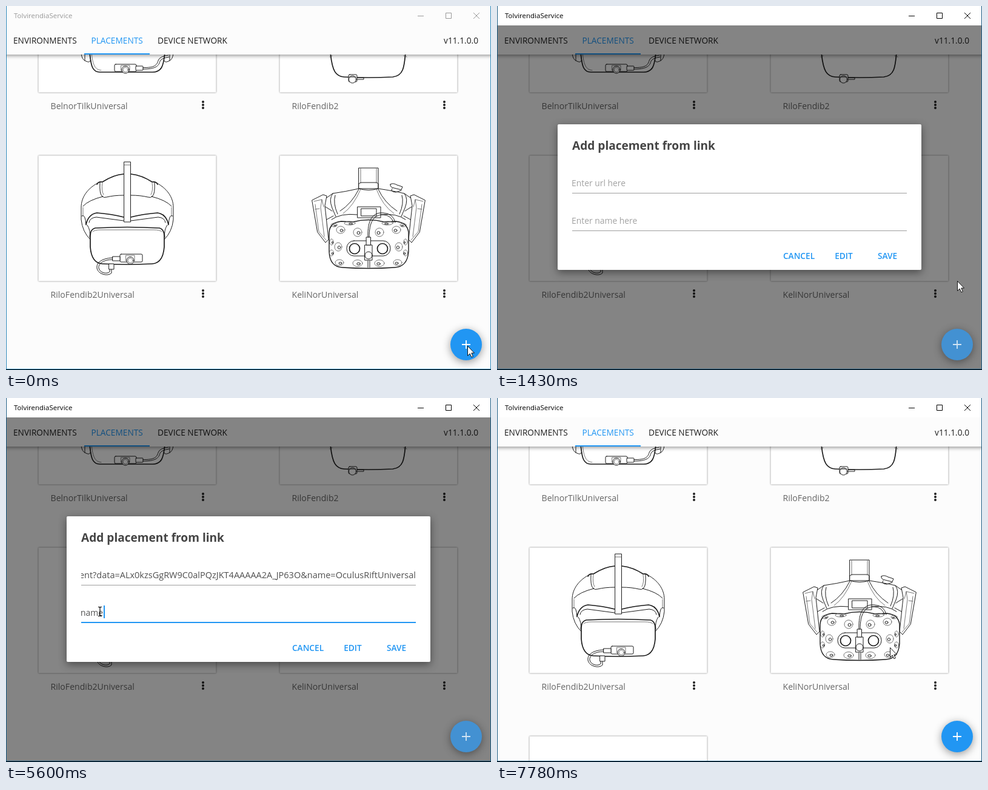
Write an HTML page that moves like this. It is 800 px wide and 600 px high and loops after 8 s.

```html
<!DOCTYPE html>
<html lang="en">
<head>
<meta charset="utf-8">
<title>Add placement from link</title>
<style>
  html, body { margin: 0; width: 100%; height: 100%; overflow: hidden; background: #fcfcfc; }
  svg { display: block; width: 800px; height: 600px; font-family: "Open Sans", "Noto Sans", sans-serif; }
  .menu { font-size: 13.7px; fill: #1c1c1c; }
  .label { font-size: 14.1px; fill: #666; }
  .field { font-size: 13.9px; fill: #505050; }
  .hint { font-size: 13.9px; fill: #a2a2a2; }
  .button { font-size: 13.7px; font-weight: 600; fill: #2196f3; text-anchor: middle; }
  .tip { font-size: 13.1px; font-weight: 600; fill: #9c9c9c; text-anchor: end; }
  .card { fill: #fff; filter: drop-shadow(0 0 1.3px rgba(0,0,0,.55)); }
  .art { fill: none; stroke: #1c1c1c; stroke-width: 1; stroke-linejoin: round; stroke-linecap: round; }
  .art .bold { stroke-width: 1.7; }
  .art .fine { stroke: #555; stroke-width: .8; }
  .art .solid { fill: #fff; }
  .raised { filter: drop-shadow(0 2px 3px rgba(0,0,0,.4)); }
  .floating { filter: drop-shadow(0 3px 7px rgba(0,0,0,.4)); }
  .blue { fill: #2196f3; }
  .icon { fill: none; stroke: #fff; stroke-width: 1.5; }
  #dialog { transform-origin: 400px 315px; }
  #plus { transform-origin: 759px 558px; stroke-width: 1.8; }
  #shade, #actions, #dialog, #newCard { opacity: 0; }
</style>
</head>
<body>
<svg viewBox="0 0 800 600">
  <defs>
    <clipPath id="urlClip"><rect x="124" y="278" width="552" height="30"/></clipPath>
    <clipPath id="pageClip"><rect x="0" y="80" width="800" height="518"/></clipPath>
    <rect id="card" class="card" x="53.5" y="246.5" width="293" height="207" rx="1"/>
    <g id="dots" fill="#222">
      <circle cx="325" cy="158" r="2"/><circle cx="325" cy="163" r="2"/><circle cx="325" cy="168" r="2"/>
    </g>
  </defs>

  <rect width="800" height="600" fill="#fcfcfc"/>

  <g clip-path="url(#pageClip)">
    <use href="#card" y="-311"/>
    <use href="#card" x="398" y="-311"/>
    <use href="#card"/>
    <use href="#card" x="398"/>
    <use id="newCard" href="#card" y="311"/>
    <use href="#dots"/>
    <use href="#dots" x="398"/>
    <use href="#dots" y="311"/>
    <use href="#dots" x="398" y="311"/>
    <g class="label">
      <text x="73.500" y="170">BelnorTilkUniversal</text>
      <text x="471.500" y="170">RiloFendib2</text>
      <text x="73.500" y="481">RiloFendib2Universal</text>
      <text x="471.500" y="481">KeliNorUniversal</text>
    </g>

    <!-- upper left headset -->
    <g class="art">
      <path class="bold" d="M138 76C140 100 143 109 155 109H242C256 109 260 100 262 76"/>
      <path class="fine" d="M141 76C143 98 147 105 157 106"/>
      <path d="M124 78Q125 89 132 91Q138 94 139 90M276 78Q275 89 268 91Q262 94 261 90M130 78V90M270 78V90"/>
      <rect class="solid" x="179" y="96" width="36" height="12" rx="2"/>
      <rect class="solid fine" x="190" y="98" width="14" height="8"/>
      <circle class="solid" cx="197" cy="105" r="6"/>
      <circle class="fine" cx="197" cy="105" r="4"/>
      <rect class="solid" x="214" y="99" width="12" height="7" rx="1"/>
      <path d="M226 101.500C244 102 249 98 251 90Q253 83 268 81M226 104C247 104 252 99 254 91Q256 86 269 84"/>
    </g>

    <!-- upper right headset -->
    <g class="art">
      <path class="bold" d="M535 76C538 108 544 116 558 117Q598 119 638 117C655 115 657 102 659 76"/>
      <path class="fine" d="M538 82L534 84M656 82L661 84"/>
      <rect class="solid" x="565" y="113" width="14" height="12" rx="2"/>
      <circle class="solid" cx="571.5" cy="121" r="6"/>
      <path d="M579 118H590V121H579M566 117H577"/>
    </g>

    <!-- lower left headset -->
    <g class="art">
      <path d="M151 292C136 300 124 314 124 332V352Q126 372 139 385M249 292C264 300 276 314 276 332V352Q274 372 261 385"/>
      <path class="bold" d="M150 294Q152 289 159 290Q178 278 194 277M206 277Q224 279 241 290Q248 289 250 294"/>
      <path d="M155 291Q154 309 158 313Q161 317 166 315Q178 312 194 312M245 291Q246 309 242 313Q239 317 234 315Q222 312 206 312"/>
      <path class="fine" d="M159 291Q157 305 161 311M241 291Q243 305 239 311M127 332V346M273 332V346"/>
      <path d="M127 330Q136 320 160 314M273 330Q264 320 240 314M125 346Q131 342 132 361M275 346Q269 342 268 361"/>
      <path class="bold" d="M132 360Q136 343 150 341Q175 343 194 348M268 360Q264 343 250 341Q225 343 206 348"/>
      <path d="M137 357Q138 349 149 348L194 354M263 357Q262 349 251 348L206 354M134 361Q140 370 138 381M266 361Q260 370 262 381"/>
      <rect class="solid" x="195" y="257" width="10.500" height="99"/>
      <path class="fine" d="M195 262H205"/>
      <path class="bold solid" d="M147 366Q200 363 253 366Q261 368 261 379V397Q259 424 241 425Q200 427 159 425Q141 424 139 397V379Q139 368 147 366Z"/>
      <path class="fine" d="M143 372Q146 369 156 369H244Q254 369 257 372"/>
      <rect class="solid" x="188" y="409" width="37" height="13" rx="2"/>
      <rect class="solid fine" x="198" y="411" width="14" height="9"/>
      <circle class="solid" cx="205" cy="419.500" r="6"/>
      <circle class="fine" cx="205" cy="419.500" r="4"/>
      <rect class="solid" x="176" y="413" width="12" height="7"/>
      <path d="M176 415C156 416 149 424 150 432C152 443 169 446 174 440V433M176 418C160 418 152 425 153 432C155 441 168 442 171 438V433"/>
      <rect class="solid" x="170" y="425" width="8" height="9"/>
    </g>

    <!-- lower right headset -->
    <g class="art">
      <g id="ear">
        <path d="M505 320L523 311L529 313L526 329L532 385L527 390L514 373Z"/>
        <path class="fine" d="M508 322L521 319L524 331M510 327L516 372L528 386M521 319L519 332L525 380M510 335L517 334"/>
        <path d="M529 316L539 309M527 331L538 338M529 352L540 346"/>
      </g>
      <use href="#ear" transform="matrix(-1 0 0 1 1196 0)"/>
      <path d="M539 309Q560 306 582 301M614 301Q640 305 657 309Q664 318 658 333L652 347M539 309Q532 318 538 333L544 347"/>
      <path d="M543 312Q539 325 547 343M653 312Q657 325 649 343M582 302Q570 326 551 338M614 302Q624 324 645 338"/>
      <path class="fine" d="M585 302Q573 330 556 342M611 302Q621 329 640 342"/>
      <path d="M537 352Q552 341 580 344M659 352Q644 341 618 344"/>
      <rect class="solid" x="582" y="267" width="32" height="34"/>
      <path class="fine" d="M585 268V292M611 268V292"/>
      <path d="M582 293Q585 290 588 291H608Q612 290 614 293V301Q598 306 582 301Z"/>
      <path d="M634 294Q633 299 640 300L652 303L654 298L645 295Q638 291 634 294ZM637 301Q633 306 643 307L652 304"/>
      <rect class="solid" x="580" y="331" width="38" height="18"/>
      <rect x="586" y="334" width="25" height="12"/>
      <path class="solid" stroke-width="1.400" d="M533 373Q534 357 553 355L572 356Q598 349 624 356L643 355Q662 357 664 373V405Q662 430 641 431Q598 434 555 431Q534 430 533 405Z"/>
      <g id="sensors"></g>
      <rect class="solid" x="562" y="387" width="72" height="25" rx="12"/>
      <circle class="bold" cx="575" cy="400" r="8.500"/>
      <circle class="bold" cx="621" cy="400" r="8.500"/>
      <rect class="solid" x="592" y="394" width="12" height="25"/>
      <circle class="solid" cx="598" cy="411" r="6"/>
      <rect class="solid" x="594.500" y="381" width="7" height="13"/>
      <path d="M597 381C596 352 605 340 622 341Q639 342 642 357M599 381C599 355 607 344 622 344Q636 345 639 357M597 420V431M600 420V431"/>
    </g>
  </g>

  <rect class="raised" x="-10" y="32" width="820" height="48" fill="#fcfcfc"/>
  <g class="menu">
    <text x="12" y="62">ENVIRONMENTS</text>
    <text x="140.500" y="62" class="blue">PLACEMENTS</text>
    <text x="250" y="62">DEVICE NETWORK</text>
    <text x="779" y="62" text-anchor="end">v11.1.0.0</text>
  </g>
  <rect class="blue" x="129" y="78" width="108" height="2"/>

  <g id="titleBar">
    <rect id="titleBack" width="800" height="32" fill="#fcfcfc"/>
    <text x="13" y="20" font-size="11.5" fill="currentColor">TolvirendiaService</text>
    <path d="M679 16.500H689M725.500 11.500H734.500V20.500H725.500ZM771 11L781 21M781 11L771 21" fill="none" stroke="currentColor"/>
  </g>

  <rect id="shade" y="32" width="800" height="568"/>

  <g id="fab">
    <circle id="disc" class="blue floating" cx="759" cy="558" r="26"/>
    <path id="plus" class="icon" d="M752 558H766M759 551V565"/>
  </g>

  <g id="actions">
    <g class="raised" fill="#fff">
      <rect x="654" y="436" width="76" height="36" rx="2"/>
      <rect x="666" y="484" width="64" height="36" rx="2"/>
    </g>
    <text class="tip" x="722" y="460">From link</text>
    <text class="tip" x="722" y="508">Custom</text>
    <g class="raised" fill="#f00">
      <circle cx="759" cy="454" r="18"/>
      <circle cx="759" cy="502" r="18"/>
    </g>
    <circle id="ripple" cx="759.500" cy="453.500" r="12.500" fill="#f97a00"/>
    <path class="icon" d="M757.500 450H755.500A4 4 0 0 0 755.500 458H757.500M760.500 450H762.500A4 4 0 0 1 762.500 458H760.500M756 454H762"/>
    <path class="icon" d="M759 497H753V508H764.500V502M757 504L758 501L764 495L766 497L760 503Z"/>
  </g>

  <g id="dialog">
    <rect x="100" y="195" width="600" height="240" rx="2" fill="#fff" style="filter:drop-shadow(0 4px 7px rgba(0,0,0,.45))"/>
    <text x="124" y="237" font-size="19.1" font-weight="700" fill="#444">Add placement from link</text>
    <path d="M124 308.500H676M124 370.500H676" stroke="#9e9e9e"/>
    <rect id="urlFocus" class="blue" x="124" y="307" width="552" height="2"/>
    <rect id="nameFocus" class="blue" x="124" y="369" width="552" height="2"/>
    <text id="urlHint" class="hint" x="123" y="297">Enter url here</text>
    <text id="nameHint" class="hint" x="123" y="359">Enter name here</text>
    <g id="url" clip-path="url(#urlClip)">
      <text class="field" x="676" y="297" text-anchor="end" style="font-size:14.5px">placement?data=ALx0kzsGgRW9C0alPQzJKT4AAAAA2A_JP63O&amp;name=OculusRiftUniversal</text>
    </g>
    <text id="name" class="field" x="123" y="359"><tspan>n</tspan><tspan>a</tspan><tspan>m</tspan><tspan>e</tspan></text>
    <g id="urlBlink"><rect id="urlCaret" class="blue" x="124" y="280" width="2" height="21"/></g>
    <g id="nameBlink"><rect id="nameCaret" class="blue" x="124" y="342" width="2" height="21"/></g>
    <text class="button" x="498" y="417">CANCEL</text>
    <text class="button" x="572" y="417">EDIT</text>
    <text class="button" x="644" y="417">SAVE</text>
  </g>

  <path id="frame" d="M.5 0V599M799.500 0V599M0 598.500H800" fill="none" stroke="#2b86b8"/>
  <rect y="599" width="800" height="1"/>

  <g id="mouse">
    <path id="arrow" d="M.5 .5V16.500L4.200 13L6.800 18.800L9.300 17.700L6.800 12H11.500Z" fill="#fff" stroke="#000" stroke-width=".9"/>
    <path id="beam" d="M-3 -7.500H-1L0 -6.500L1 -7.500H3M0 -6.500V6.500M-3 7.500H-1L0 6.500L1 7.500H3" fill="none" stroke="#000" stroke-width="1.200"/>
  </g>
</svg>

<script>
const LOOP = 8000;
const $ = id => document.getElementById(id);

// keys: [ms, value] pairs, the first at 0
function play(el, prop, keys, easing = 'linear') {
  const all = [...keys, [LOOP, keys[keys.length - 1][1]]];
  el.animate(
    all.map(([ms, value]) => ({ offset: ms / LOOP, [prop]: value, easing })),
    { duration: LOOP, iterations: Infinity }
  );
}
const jump = (el, prop, keys) => play(el, prop, keys, 'step-end');

// toggles visibility at each time
function flip(el, times, start = 0) {
  jump(el, 'opacity', [0, ...times].map((ms, i) => [ms, (start + i) % 2]));
}

const move = (x, y) => `translate(${x}px, ${y}px)`;

// sensor dimples: the left half is mirrored
const dimples = [
  [552, 369, 7, 6], [580, 373, 7, 7], [567, 358, 9, 3], [548, 397, 6, 7],
  [537, 407, 3.5, 5], [537, 389, 3, 5], [550, 423, 7, 5], [580, 424, 8, 5.5], [541, 361, 5, 3]
];
$('sensors').innerHTML = dimples.map(([x, y, rx, ry]) => [x, 1196 - x].map(cx => {
  const inner = cx + (cx < 598 ? 1.5 : -1.5);
  return `<ellipse class="fine" cx="${cx}" cy="${y}" rx="${rx}" ry="${ry}"/>` +
    `<ellipse cx="${inner}" cy="${y + 1}" rx="${rx * .35}" ry="${ry * .35}"/>`;
}).join('')).join('');

// window gets the focus
jump($('titleBar'), 'color', [[0, '#999'], [260, '#000']]);
jump($('titleBack'), 'fill', [[0, '#fcfcfc'], [260, '#fff']]);
jump($('frame'), 'stroke', [[0, '#2b86b8'], [260, '#1a5a82']]);

// action menu
play($('shade'), 'opacity', [[0, 0], [240, 0], [390, .5], [1300, .5], [1425, .48], [7510, .48], [7640, .145], [7710, 0]]);
play($('actions'), 'opacity', [[0, 0], [240, 0], [390, 1], [1330, 1], [1420, 0]]);
play($('plus'), 'transform', [[0, 'rotate(0deg)'], [240, 'rotate(0deg)'], [390, 'rotate(45deg)'],
  [1330, 'rotate(45deg)'], [1425, 'rotate(0deg)']]);
play($('plus'), 'opacity', [[0, 1], [1330, 1], [1425, .75], [7510, .75], [7640, .85], [7710, 1]]);
play($('disc'), 'fill', [[0, '#2196f3'], [1330, '#2196f3'], [1425, '#4391d2'],
  [7510, '#4391d2'], [7640, '#2684d3'], [7710, '#2196f3']]);
flip($('ripple'), [1280, 1400]);

// dialog
play($('dialog'), 'opacity', [[0, 0], [1330, 0], [1425, 1], [7510, 1], [7570, .3], [7640, .03], [7680, 0]]);
play($('dialog'), 'transform', [[0, 'scale(.9)'], [1330, 'scale(.9)'], [1425, 'scale(1)'],
  [7510, 'scale(1)'], [7570, 'scale(.92)'], [7630, 'scale(.9)']]);
flip($('urlFocus'), [1570, 4340]);
flip($('nameFocus'), [4340]);
flip($('url'), [3530]);
flip($('urlHint'), [3530], 1);
flip($('nameHint'), [4800], 1);
flip($('urlBlink'), [1570, 2040, 2410, 2810, 2940, 3200, 3330, 4060, 4270, 4340]);
jump($('urlCaret'), 'transform', [[0, move(0, 0)], [3530, move(552, 0)]]);
flip($('nameBlink'), [4340, 4540, 4740, 5470, 5600, 5730, 5930, 6400, 6670, 6910, 7110]);

const typed = [4800, 4940, 5070, 5270];
[...$('name').children].forEach((letter, i) =>
  jump(letter, 'fill', [[0, 'transparent'], [typed[i], '#505050']]));
jump($('nameCaret'), 'transform', [[0, move(0, 0)],
  ...[8, 16, 29, 37].map((x, i) => [typed[i], move(x, 0)])]);

flip($('newCard'), [7740]);

// pointer
play($('mouse'), 'transform', [
  [0, 761, 560], [560, 761, 560], [800, 757, 520], [1090, 759, 453], [1450, 759, 453],
  [2040, 453, 367], [2810, 158, 287], [3600, 158, 287], [4270, 155, 352], [5870, 155, 352],
  [6690, 646, 409], [6770, 646, 409], [6910, 648, 411]
].map(([ms, x, y]) => [ms, move(x, y)]));
const swaps = [1960, 2280, 2595, 3830, 4170, 6160];
flip($('beam'), swaps);
flip($('arrow'), swaps, 1);
</script>
</body>
</html>
```
